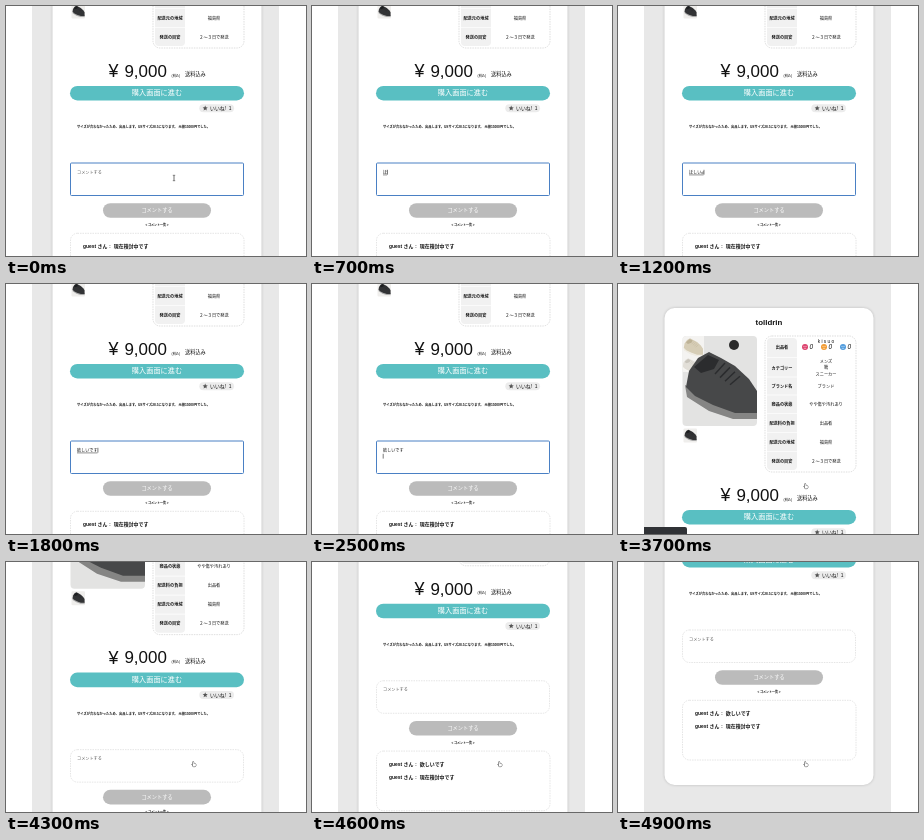
Animation of 300 by 250 pixels, one loop 5000 ms. Source, as an HTML page with a canvas:

```html
<!DOCTYPE html>
<html lang="ja">
<head>
<meta charset="utf-8">
<title>コメント投稿</title>
<style>
html, body { margin: 0; width: 100%; height: 100%; overflow: hidden; background: #fff; }
canvas { display: block; width: 300px; height: 250px; }
</style>
</head>
<body>
<canvas id="stage"></canvas>
<script>
const W = 300, H = 250, LOOP = 5000;
const FONT = '"Liberation Sans", "Noto Sans CJK JP", "Noto Sans CJK", sans-serif';
const canvas = document.getElementById('stage');
const ctx = canvas.getContext('2d');
const dpr = window.devicePixelRatio || 1;
canvas.width = W * dpr;
canvas.height = H * dpr;

const SUBMIT = 2950, RELOAD = 3350;
const SCROLL_FROM = 3720, SCROLL_TO = 4900;

// Start time, text, still composing
const TYPING = [
  [0, ''], [600, 'ほ', true], [800, 'ほs', true], [900, 'ほし', true],
  [1050, 'ほしい', true], [1200, 'ほしいd', true], [1300, 'ほしいで', true],
  [1450, 'ほしいです', true], [1800, '欲しいです', true],
  [2150, '欲しいです'], [2400, '欲しいです\n']
];

const ROWS = [
  [63, '出品者'], [84, 'カテゴリー'], [102, 'ブランド名', 'ブランド'],
  [120, '商品の状態', 'やや傷や汚れあり'], [139, '配送料の負担', '出品者'],
  [158, '配送元の地域', '福島県'], [177, '発送の目安', '２〜３日で発送']
];

const clamp = (v, a, b) => Math.min(b, Math.max(a, v));
const mix = (a, b, u) => a + (b - a) * u;
const smooth = u => u * u * (3 - 2 * u);
const progress = (t, a, b) => clamp((t - a) / (b - a), 0, 1);

// Fonts are set ten times larger and scaled down, so tiny sizes stay exact
function text(str, x, y, size, opt = {}) {
  ctx.save();
  ctx.translate(x, y + 0.4);
  ctx.scale(0.1, 0.1);
  ctx.font = `${opt.style || ''} ${opt.weight || 400} ${size * 10}px ${FONT}`;
  ctx.textAlign = opt.align || 'left';
  ctx.textBaseline = 'middle';
  ctx.fillStyle = opt.color || '#111';
  ctx.fillText(str, 0, 0);
  const width = ctx.measureText(str).width / 10;
  ctx.restore();
  return width;
}

function box(x, y, w, h, r, fill) {
  ctx.beginPath();
  ctx.roundRect(x, y, w, h, r);
  if (fill) {
    ctx.fillStyle = fill;
    ctx.fill();
  }
}

function outline(color, width, dash = []) {
  ctx.strokeStyle = color;
  ctx.lineWidth = width;
  ctx.setLineDash(dash);
  ctx.stroke();
  ctx.setLineDash([]);
}

function poly(color, ...p) {
  ctx.beginPath();
  for (let i = 0; i < p.length; i += 2) ctx.lineTo(p[i], p[i + 1]);
  ctx.closePath();
  ctx.fillStyle = color;
  ctx.fill();
}

function disc(x, y, r, color) {
  ctx.beginPath();
  ctx.arc(x, y, r, 0, Math.PI * 2);
  ctx.fillStyle = color;
  ctx.fill();
}

function line(color, width, x1, y1, x2, y2) {
  ctx.beginPath();
  ctx.moveTo(x1, y1);
  ctx.lineTo(x2, y2);
  outline(color, width);
}

function star(x, y, r, color) {
  ctx.beginPath();
  for (let i = 0; i < 10; i++) {
    const a = -Math.PI / 2 + i * Math.PI / 5, d = i % 2 ? r * 0.45 : r;
    ctx.lineTo(x + d * Math.cos(a), y + d * Math.sin(a));
  }
  ctx.fillStyle = color;
  ctx.fill();
}

// Heel at the upper left, toe at the lower right
function shoe(x, y, k, upper, collar, sole) {
  ctx.save();
  ctx.translate(x, y);
  ctx.scale(k, k);
  poly(sole, 2, 34, 32, 48, 74, 56, 74, 68, 50, 68, 26, 60, 4, 46);
  poly(upper, 3, 36, 6, 20, 15, 7, 26, 1, 38, 7, 52, 15, 66, 28, 74, 40, 74, 62, 52, 62, 30, 54, 12, 45);
  poly(collar, 11, 16, 25, 4, 36, 9, 31, 18, 18, 22);
  for (let i = 0; i < 4; i++) {
    line(collar, 1.5, 32 + i * 5, 23 + i * 3.6, 42 + i * 5, 12 + i * 4.4);
  }
  ctx.restore();
}

function photo() {
  ctx.save();
  box(64.5, 52, 74.5, 90, 4, '#e3e3e2');
  ctx.clip();
  ctx.fillStyle = '#f4f3f1';
  ctx.fillRect(64, 52, 22, 36);
  shoe(65, 54, 0.27, '#d6cdb6', '#bdb296', '#efece4');
  shoe(64, 74, 0.24, '#e2dfd8', '#c9c5bc', '#f8f7f4');
  shoe(65, 67, 1, '#474849', '#2b2c2e', '#858584');
  disc(116, 61, 5, '#2b2b2b');
  ctx.restore();

  box(65.5, 144.5, 13.5, 14, 1, '#efeeec');
  shoe(66, 145.5, 0.17, '#323335', '#1d1e20', '#aaa');
}

function table() {
  box(149, 54, 30, 132, 4, '#f1f1f1');
  box(147, 52, 91, 136, 7);
  outline('#c8c8c8', 0.6, [1.5, 1]);
  ROWS.forEach(([y, label, value], i) => {
    text(label, 164, y, 4.2, { weight: 700, align: 'center' });
    if (value) text(value, 208, y, 4.2, { align: 'center' });
    if (i) {
      const edge = (y + ROWS[i - 1][0]) / 2;
      line('#fff', 0.7, 149, edge, 179, edge);
    }
  });
  ['メンズ', '靴', 'スニーカー'].forEach((s, i) => {
    text(s, 208, 77.3 + i * 6.4, 4.2, { align: 'center' });
  });
  text('k i s u o', 208, 57, 4.8, { align: 'center' });
  ['#dc3f6c', '#f2992e', '#4f9bdd'].forEach((color, i) => {
    const x = 187 + i * 19;
    disc(x, 63, 3, color);
    disc(x - 1, 62.2, 0.5, '#fff');
    disc(x + 1, 62.2, 0.5, '#fff');
    line('#fff', 0.5, x - 1.2, 64.3, x + 1.2, 64.3);
    text('0', x + 4.4, 63.2, 6.4, { style: 'italic' });
  });
}

function purchase() {
  text('¥', 107.6, 211.7, 18, { align: 'center' });
  text('9,000', 118.4, 211.7, 17);
  text('(税込)', 165.6, 215.3, 3.2);
  text('送料込み', 179, 214.4, 5.2);
  box(64, 225.9, 174, 14.6, 7.3, '#59bfc2');
  text('購入画面に進む', 151, 232.7, 7.2, { color: '#fff', weight: 500, align: 'center' });
  box(193.3, 244.3, 34.7, 8, 4, '#ececec');
  star(199.2, 248.3, 2.7, '#555');
  text('いいね!  1', 204, 248.1, 4.9);
  text('サイズが合わなかったため、出品します。USサイズ28.5になります。 元値15000円でした。',
    71, 267, 3.23, { weight: 700 });
}

function field(t) {
  const focused = t < SUBMIT;
  box(64.5, 303, 173, 32.5, focused ? 1 : 7, '#fff');
  if (focused) outline('#4a80c4', 1);
  else outline('#d4d4d4', 0.6, [1.5, 1]);

  const [, typed, composing] = TYPING.filter(k => k[0] <= t).pop();
  if (!typed || t >= RELOAD) {
    text('コメントする', 71, 312, 4.15, { color: '#5c5c5c' });
    return;
  }
  const lines = typed.split('\n');
  const width = text(lines[0], 71, 312, 4.1);
  if (composing) line('#222', 0.5, 71, 314.9, 71 + width, 314.9);
  if (focused) {
    const last = lines.length > 1;
    const x = last ? 71.2 : 71.4 + width, y = last ? 318.2 : 312.2;
    line('#222', 0.6, x, y - 2.4, x, y + 2.4);
  }
}

function comments(t) {
  box(97, 343.2, 108, 14.6, 7.3, '#bbb');
  text('コメントする', 151, 350.3, 5.2, { color: '#fff', weight: 500, align: 'center' });
  text('< コメント一覧 >', 151, 365.2, 3, { weight: 700, align: 'center' });
  box(64.5, 373.3, 173.5, 59.7, 7);
  outline('#d4d4d4', 0.6, [1.5, 1]);
  const list = t < RELOAD ? ['現在検討中です'] : ['欲しいです', '現在検討中です'];
  list.forEach((s, i) => {
    text('guest さん： ' + s, 77, 386.6 + i * 12.8, 4.95, { weight: 700 });
  });
}

function beam(x, y) {
  line('#333', 0.7, x, y - 2.5, x, y + 2.5);
  line('#333', 0.6, x - 1.2, y - 2.7, x + 1.2, y - 2.7);
  line('#333', 0.6, x - 1.2, y + 2.7, x + 1.2, y + 2.7);
}

function hand(x, y) {
  ctx.beginPath();
  ctx.roundRect(x - 1.4, y - 2.6, 1.1, 3.4, 0.5);
  ctx.roundRect(x - 1.4, y - 0.7, 3.2, 3, 0.9);
  ctx.moveTo(x - 1.2, y + 1.5);
  ctx.lineTo(x - 2.2, y - 0.1);
  outline('#333', 0.9);
  ctx.fillStyle = '#fff';
  ctx.fill();
}

function pointer(t) {
  if (t < 550) return beam(168, 172);
  if (t < 2600) return;
  const u = smooth(progress(t, 2600, 2900));
  const x = mix(168, 188, u), y = mix(172, 202.3, u);
  if (y < 190) beam(x, y);
  else hand(x, y);
}

function scrollAt(t) {
  if (t < RELOAD) return 146;
  const u = progress(t, SCROLL_FROM, SCROLL_TO);
  return 235 * mix(u, smooth(u), 0.4);
}

function draw(t) {
  ctx.setTransform(dpr, 0, 0, dpr, 0, 0);
  ctx.fillStyle = '#fff';
  ctx.fillRect(0, 0, W, H);

  ctx.save();
  ctx.beginPath();
  ctx.rect(26, 0, 247, H);
  ctx.clip();
  ctx.fillStyle = '#e8e8e8';
  ctx.fillRect(26, 0, 247, H);

  ctx.save();
  ctx.translate(0, -scrollAt(t));
  ctx.shadowColor = 'rgba(0,0,0,0.2)';
  ctx.shadowBlur = 3 * dpr;
  box(46.5, 24, 209, 434, 10, '#fff');
  ctx.shadowColor = 'transparent';
  text('tolldrin', 151, 38, 7.9, { weight: 700, align: 'center' });
  photo();
  table();
  purchase();
  field(t);
  comments(t);
  ctx.restore();

  if (t >= RELOAD && t < 3900) box(26, 243, 43, 8, [0, 2, 0, 0], '#303236');
  pointer(t);
  ctx.restore();
}

const start = performance.now();
function tick() {
  draw((performance.now() - start) % LOOP);
  requestAnimationFrame(tick);
}
tick();
</script>
</body>
</html>
```
